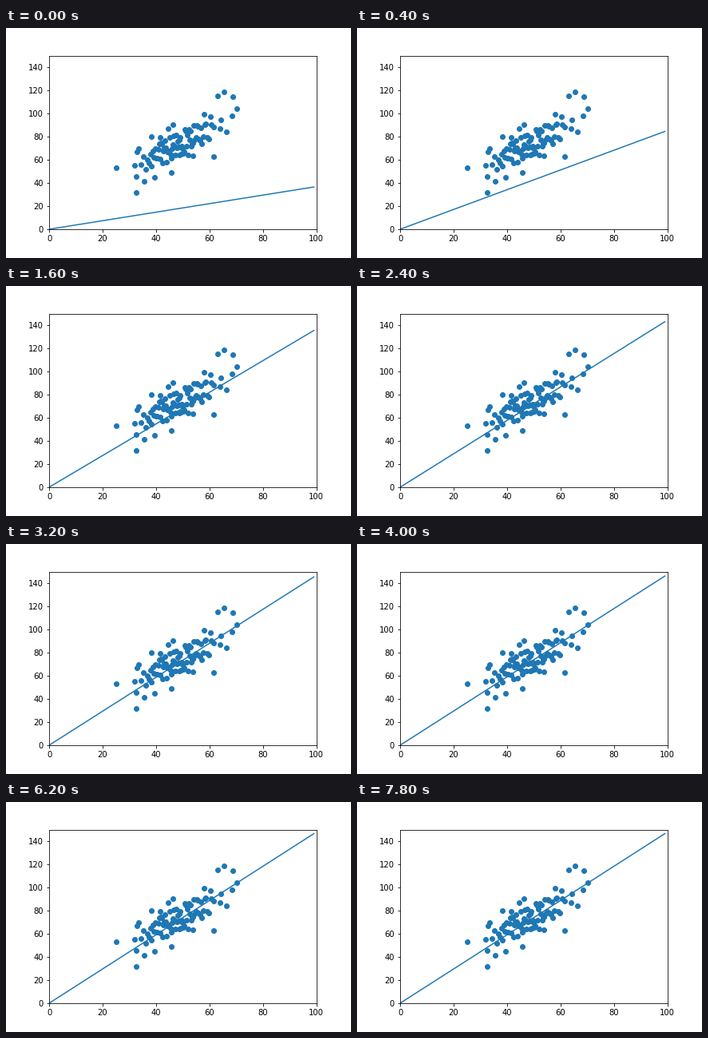
Animation, 432 px wide and 288 px high, one loop 8 s. Source, as a matplotlib script:

```python
import numpy as np
import matplotlib.pyplot as plt
from matplotlib.animation import FuncAnimation

FRAMES, STEP_MS = 40, 200
RATE = 1e-4
# Sample means of x, y, x*x and x*y that drive the fit
MX, MY, MXX, MXY = 48.96, 72.74, 2491, 3687

# Points that stand clear of the main cloud
OUTER = [
    (25.1, 53.4), (32.5, 31.7), (32.7, 45.6), (35.6, 41.4), (32.9, 67.2),
    (33.6, 69.9), (38.1, 80.2), (39.3, 44.9), (41.4, 79.1), (44.5, 86.6),
    (46.2, 90.1), (45.6, 48.8), (53.7, 63.6), (61.5, 62.6), (57.8, 99.1),
    (60.3, 97.4), (64.2, 94.4), (63, 115.2), (65.4, 118.6), (66.2, 83.9),
    (68.3, 97.9), (68.8, 114.8), (70.3, 104.3),
]


def core_cloud(n, seed=4):
    """Points densest mid-way, spread about a rising trend."""
    rng = np.random.default_rng(seed)
    x = 48 + 16 * np.arcsin(np.linspace(-1, 1, n)) / (np.pi / 2)
    spread = 13 * np.sin(np.pi * (x - 29) / 40)
    return np.column_stack([x, 16 + 1.15 * x + spread * rng.uniform(-1, 1, n)])


def descend(steps):
    """Gradient descent of y = m*x + b, starting from zero."""
    m = b = 0.0
    path = []
    for _ in range(steps):
        dm = MXY - m * MXX - b * MX
        db = MY - m * MX - b
        m, b = m + RATE * dm, b + RATE * db
        path.append((m, b))
    return path


cloud = np.vstack([OUTER, core_cloud(75)])
fit = descend(FRAMES)
xs = np.arange(100)

fig = plt.figure(figsize=(6, 4), dpi=72, facecolor="white")
fig.subplots_adjust(left=0.125, right=0.9, bottom=0.125, top=0.88)
ax = fig.add_subplot()
ax.scatter(*cloud.T, color="C0")
line, = ax.plot([], [], color="C0")
ax.set(xlim=(0, 100), ylim=(0, 150))


def update(i):
    m, b = fit[i]
    line.set_data(xs, m * xs + b)
    return line,


anim = FuncAnimation(fig, update, frames=FRAMES, interval=STEP_MS,
                     init_func=lambda: update(0), repeat=True, repeat_delay=0)
plt.show()
```
